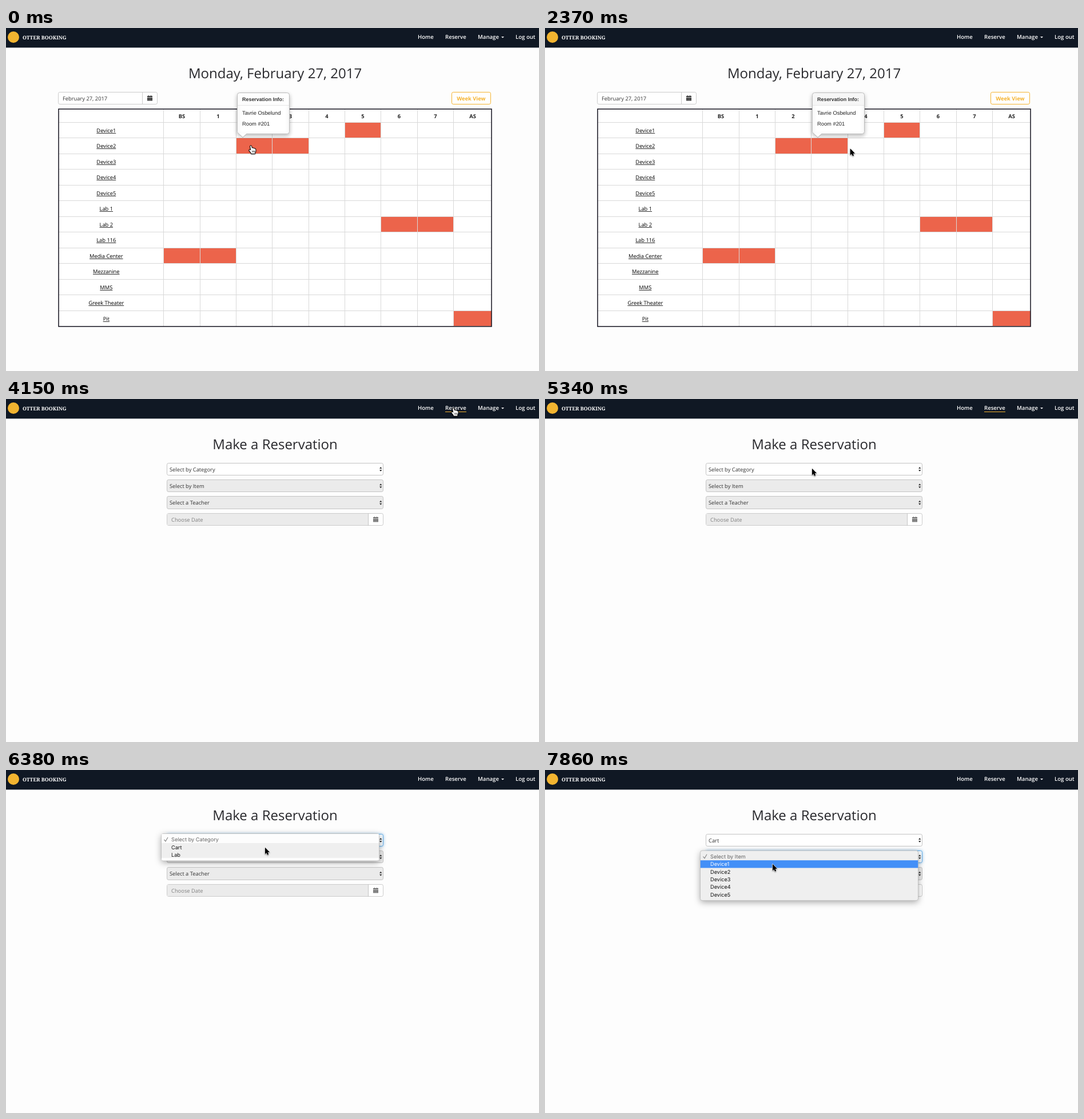
Recreate the animation shown at these times as an HTML page with a canvas. Size 932 by 601 pixels, loop 8000 ms.

```html
<!DOCTYPE html>
<html lang="en">
<head>
<meta charset="utf-8">
<title>Room booking</title>
<style>
html, body { margin: 0; width: 100%; height: 100%; overflow: hidden; background: #fdfdfd; }
canvas { display: block; }
</style>
</head>
<body>
<canvas id="stage" width="932" height="601"></canvas>
<script>
const ctx = document.getElementById('stage').getContext('2d');
const LOOP = 8000, TICK = LOOP / 54;
const OPEN = '"Open Sans", sans-serif';
const ARIAL = '"Liberation Sans", Arial, sans-serif';
const MENU = 'Inter, sans-serif';
const BODY = '9.33px ' + OPEN, BOLD = '700 9.33px ' + OPEN;
const RED = '#ec644b', GOLD = '#f5b330', PAGE = '#fdfdfd', BLUE = '#66afe9';

const CARTS = [1, 2, 3, 4, 5].map(n => 'Device' + n);
const ROOMS = [...CARTS, 'Lab 1', 'Lab 2', 'Lab 116', 'Media Center',
  'Mezzanine', 'MMS', 'Greek Theater', 'Pit'];
const PERIODS = ['BS', '1', '2', '3', '4', '5', '6', '7', 'AS'];
const BOOKED = [[0, 5], [1, 2], [1, 3], [6, 6], [6, 7], [8, 0], [8, 1], [12, 8]]; // row, column

// pointer moves: first tick, last tick, end x, end y
const START = [428.5, 206];
const MOVES = [
  [4, 9, 495, 207], [13, 15, 515, 217], [15, 21, 769, 143], [21, 24, 782.5, 15.5],
  [30, 36, 467, 122], [37, 41, 453, 136], [43, 48, 408, 156], [48, 49, 402, 154],
  [50, 53, 398, 165]
];

const colX = i => i > 8 ? 849 : Math.floor(275.7 + i * 63.33);
const rowY = i => Math.floor(165 + i * 27.5);
const ease = p => p * p * (3 - 2 * p);

function rect(x, y, w, h, color) {
  ctx.fillStyle = color;
  ctx.fillRect(x, y, w, h);
}

function box(x, y, w, h, fill, line, r = 2.7) {
  ctx.beginPath();
  ctx.roundRect(x + .5, y + .5, w - 1, h - 1, r);
  ctx.fillStyle = fill;
  ctx.fill();
  ctx.lineWidth = 1;
  ctx.strokeStyle = line;
  ctx.stroke();
}

function shade(color, blur, dy = 0) {
  ctx.shadowColor = color;
  ctx.shadowBlur = blur;
  ctx.shadowOffsetY = dy;
}

function text(s, x, y, font, color, align = 'left') {
  ctx.font = font;
  ctx.textRendering = 'geometricPrecision';
  ctx.fillStyle = color;
  ctx.textAlign = align;
  ctx.fillText(s, x, y);
}

function poly(points, fill, line, width = 1) {
  ctx.beginPath();
  points.forEach(([x, y]) => ctx.lineTo(x, y));
  ctx.closePath();
  if (line) {
    ctx.lineWidth = width;
    ctx.lineJoin = 'round';
    ctx.strokeStyle = line;
    ctx.stroke();
  }
  ctx.fillStyle = fill;
  ctx.fill();
}

function calendar(x, y, color) {
  rect(x, y + 1, 9, 8.5, color);
  rect(x + 2, y, 1, 1, color);
  rect(x + 6, y, 1, 1, color);
  rect(x, y + 3, 9, 1, '#ccc');
  ctx.globalAlpha = .5;
  for (let i = 0; i < 6; i++) rect(x + 1.5 + i % 3 * 2.4, y + 5 + (i > 2) * 2.4, 1, 1, '#fff');
  ctx.globalAlpha = 1;
}

function nav(k) {
  rect(0, 0, 932, 34.4, '#101824');
  ctx.beginPath();
  ctx.arc(13, 16, 10, 0, 7);
  ctx.fillStyle = '#f2b430';
  ctx.fill();
  text('OTTER BOOKING', 29, 19.5, '700 8.9px "Noto Serif", serif', '#fff');
  [['Home', 720], ['Reserve', 768], ['Manage', 825], ['Log out', 891]]
    .forEach(([s, x]) => text(s, x, 19, '600 9.6px ' + OPEN, '#fff'));
  poly([[866, 15], [871, 15], [868.5, 17.6]], '#fff');
  if (k >= 24 && k < 38) rect(768, 22, 37, 1, GOLD);
}

function title(s) {
  text(s, 470.5, 88, '24px ' + OPEN, '#29292d', 'center');
}

function popover(x, alpha, head) {
  if (!alpha) return;
  ctx.save();
  ctx.globalAlpha = alpha;
  shade('rgba(0,0,0,.25)', 7, 3);
  box(x, 113, 92, 73, '#fff', '#bdbdbd', 4);
  shade('transparent', 0);
  rect(x + 2, 115, 88, 20, head);
  rect(x + 1, 135, 90, 1, '#e6e6e6');
  poly([[x + 3, 186], [x + 10, 192.5], [x + 17, 186]], '#bdbdbd');
  poly([[x + 3.5, 185], [x + 10, 191], [x + 16.5, 185]], '#fff');
  text('Reservation Info:', x + 9, 127.5, '700 8.95px ' + ARIAL, '#333');
  text('Tavrie Osbelund', x + 9, 151.5, '9.33px ' + ARIAL, '#222');
  text('Room #201', x + 9, 171, '9.33px ' + ARIAL, '#222');
  ctx.restore();
}

function dayPage(k) {
  title('Monday, February 27, 2017');
  box(91, 112, 174, 22, '#fff', '#ccc');
  rect(238, 113, 1, 20, '#ccc');
  text('February 27, 2017', 99, 126.5, BODY, '#333');
  calendar(247, 118, '#3c3c3c');
  box(779, 112, 69, 22, '#fff', GOLD);
  text('Week View', 813.3, 126.5, BOLD, GOLD, 'center');

  rect(92, 142, 757, 381, '#fff');
  BOOKED.forEach(([r, c]) =>
    rect(colX(c), rowY(r), colX(c + 1) - colX(c), rowY(r + 1) - rowY(r), RED));
  for (let i = 0; i < 13; i++) rect(92, rowY(i), 757, 1, '#d9d9d9');
  for (let i = 0; i < 9; i++) rect(colX(i), 142, 1, 381, '#d9d9d9');
  ctx.lineWidth = 1.5;
  ctx.strokeStyle = '#12101c';
  ctx.strokeRect(92, 142, 757, 381);

  PERIODS.forEach((s, i) =>
    text(s, (colX(i) + colX(i + 1) + 1) / 2, 157.5, BOLD, '#222', 'center'));
  ROOMS.forEach((s, i) => {
    const y = 182.5 + i * 27.5;
    text(s, 175.3, y, BODY, '#000', 'center');
    const w = ctx.measureText(s).width;
    rect(175.3 - w / 2, Math.round(y) + 1, w, 1, '#333');
  });

  const fade = k === 7 ? .5 : 0;
  popover(404, k < 7 ? 1 : fade, '#fdfdfd');
  popover(467, k === 17 ? .5 : k > 7 && k < 17 ? 1 : fade, '#f6f6f6');
}

function select(label, row, enabled, focus) {
  const y = 112 + row * 29.33, top = Math.floor(y);
  ctx.save();
  if (focus) shade('rgba(102,175,233,.6)', 5);
  box(281, top, 379, Math.round(y + 22) - top, enabled ? '#fff' : '#ebebeb', focus ? BLUE : '#c4c4c4');
  ctx.restore();
  text(label, 286, y + 14.5, BODY, '#333');
  poly([[653, y + 10], [657.4, y + 10], [655.2, y + 7]], '#333');
  poly([[653, y + 12], [657.4, y + 12], [655.2, y + 15]], '#333');
}

function menu(y, items, active, pale) {
  const h = 7.5 + items.length * 13.33;
  ctx.save();
  shade('rgba(0,0,0,.35)', 12, 3);
  ctx.beginPath();
  ctx.roundRect(271.5, y, 381, h, 3.5);
  ctx.fillStyle = '#efefef';
  ctx.fill();
  shade('transparent', 0);
  ctx.lineWidth = .7;
  ctx.strokeStyle = '#b5b5b5';
  ctx.stroke();
  ctx.clip();
  if (pale) {
    rect(272, y + .5, 380, 16, PAGE);
    rect(272, y + h - 5, 380, 4.5, PAGE);
  }
  if (active) rect(271.5, y + 3.7 + active * 13.33, 381, 13.33, '#438ff7');
  ctx.restore();
  items.forEach((s, i) => {
    const color = i === 0 ? '#666' : i === active ? '#fff' : '#111';
    text(s, 289, y + 13.8 + i * 13.33, '9.2px ' + MENU, color);
  });
  ctx.beginPath();
  ctx.moveTo(276.5, y + 10.5);
  ctx.lineTo(279, y + 13.5);
  ctx.lineTo(283, y + 6.5);
  ctx.lineWidth = 1.2;
  ctx.strokeStyle = '#888';
  ctx.stroke();
}

function formPage(k) {
  title('Make a Reservation');
  const picked = k >= 45;
  select(picked ? 'Cart' : 'Select by Category', 0, true, k >= 37 && k < 50);
  select('Select by Item', 1, picked, k >= 50);
  select('Select a Teacher', 2, false, false);
  box(281, 200, 379, 22, '#fff', '#ccc');
  rect(282, 201, 351, 20, '#ebebeb');
  rect(633, 200, 1, 22, '#c4c4c4');
  text('Choose Date', 289, 214.5, BODY, '#808080');
  calendar(642, 206, '#777');

  if (k >= 37 && k < 45) {
    const lit = k >= 39 && k !== 43;
    menu(111.5, ['Select by Category', 'Cart', 'Lab'], lit ? 1 : 0, true);
  }
  if (k >= 50) menu(141.2, ['Select by Item', ...CARTS], k >= 52 ? 1 : 0, false);
}

function pointerAt(k) {
  let [x, y] = START;
  for (const [a, b, toX, toY] of MOVES) {
    if (k <= a) break;
    const p = ease(Math.min(1, (k - a) / (b - a)));
    x += (toX - x) * p;
    y += (toY - y) * p;
  }
  return [x, y];
}

function arrow() {
  const shape = [[0, 0], [0, 11], [2.5, 8.7], [4.2, 12.6], [6, 11.8], [4.4, 8], [7.8, 8]];
  ctx.save();
  shade('rgba(0,0,0,.35)', 2, 1);
  poly(shape, '#000', '#fff', 1.6);
  ctx.restore();
  poly(shape, '#000');
}

function hand() {
  ctx.save();
  shade('rgba(0,0,0,.3)', 2, 1);
  poly([[-1.4, 1], [-.4, .3], [.6, 1], [1.4, 4.6], [3, 4.2], [4, 5], [5.4, 4.8], [6.2, 5.7],
    [7.3, 5.7], [8, 7], [7.8, 10], [6.8, 12], [6.8, 14], [.4, 14], [0, 12.4], [-3.2, 8.6],
    [-3, 7.4], [-1.6, 7.4], [-.2, 8.6]], '#fff', '#000', 1.8);
  ctx.restore();
  [2, 3.9, 5.7].forEach(x => rect(x, 8.8, .7, 3.2, '#000'));
}

function pointer(k) {
  const [x, y] = pointerAt(k);
  const onCell = k < 28 && y > 193 && x < 529;
  const onLink = y < 30 && x >= 768 && x <= 805;
  ctx.save();
  ctx.translate(x, y);
  (onCell || onLink ? hand : arrow)();
  ctx.restore();
}

function draw(now) {
  const k = Math.min(53, Math.floor((now % LOOP + 6) / TICK));
  rect(0, 0, 932, 601, PAGE);
  nav(k);
  (k < 28 ? dayPage : formPage)(k);
  pointer(k);
  requestAnimationFrame(draw);
}

requestAnimationFrame(draw);
</script>
</body>
</html>
```
